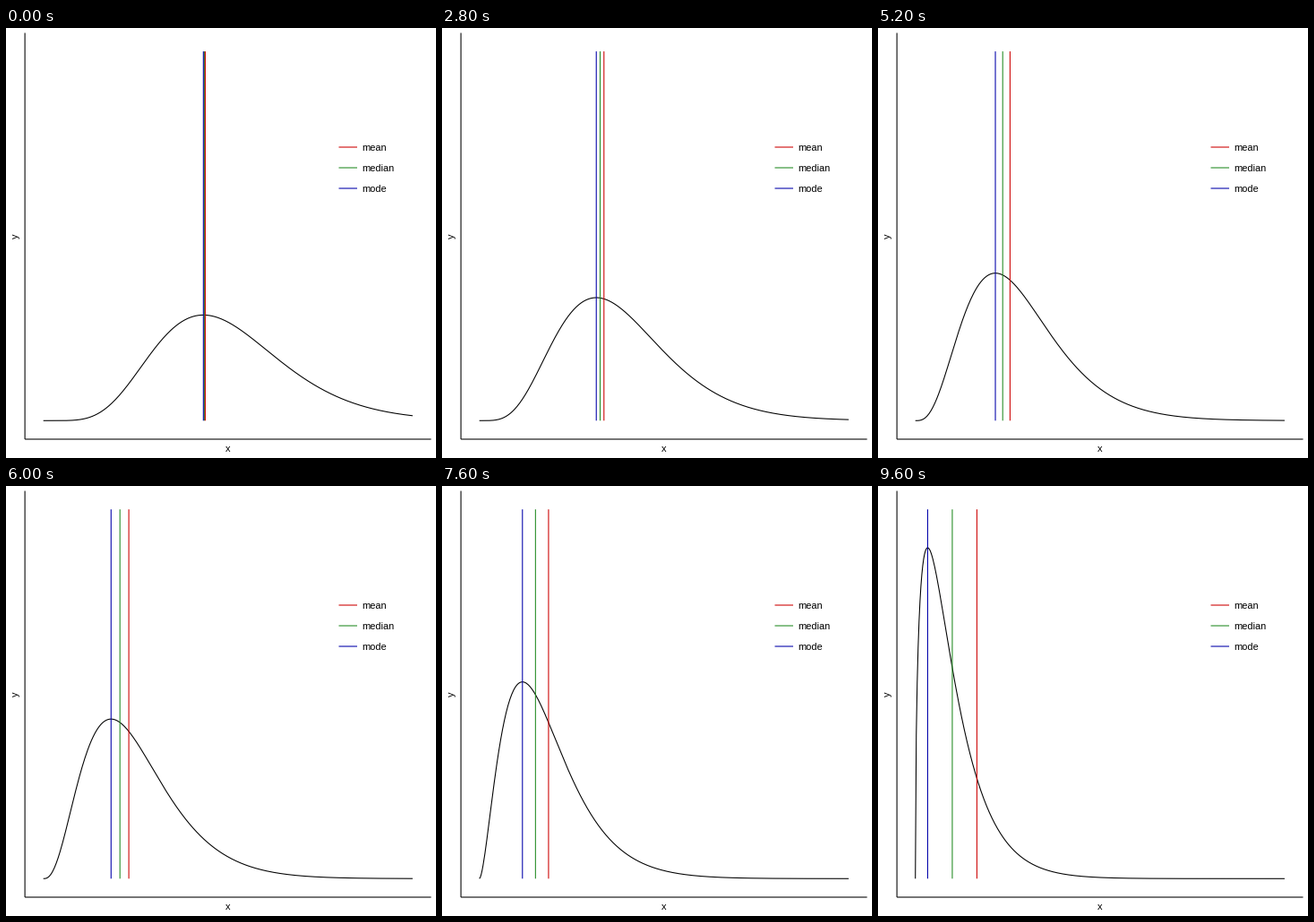
A matplotlib script that plays this animation: 480x480 px, repeating every 10 s.

```python
import math

import matplotlib.pyplot as plt
import numpy as np
from matplotlib.animation import FuncAnimation

SIZE, DPI = 480, 100
PX = 72 / DPI                     # one pixel in points
FRAMES, INTERVAL = 25, 400

LEFT, RIGHT = 41.7, 453.9         # data area in pixels
TOP, BOTTOM = 26.1, 438.3
X_MAX, Y_MAX = 30, 0.27
LINE = 1.07 * PX
RED, GREEN, BLUE = "#cd0000", "#228b22", "#0000aa"

plt.rcParams["font.family"] = "Liberation Sans"
plt.rcParams["font.size"] = 11 * PX


def to_x(v):
    return LEFT + (RIGHT - LEFT) * v / X_MAX


def to_y(v):
    return BOTTOM - (BOTTOM - TOP) * v / Y_MAX


def chi2_pdf(x, df):
    h = df / 2
    return x ** (h - 1) * np.exp(-x / 2) / (2 ** h * math.gamma(h))


fig = plt.figure(figsize=(SIZE / DPI, SIZE / DPI), dpi=DPI, facecolor="white")
ax = fig.add_axes([0, 0, 1, 1])
ax.set_xlim(0, SIZE)
ax.set_ylim(SIZE, 0)
ax.axis("off")


def stroke(xs, ys, color="black", **kw):
    # unsnapped, so lines keep their place between pixels
    return ax.plot(xs, ys, color=color, lw=LINE, snap=False,
                   solid_capstyle="butt", **kw)[0]


# axes and their titles
stroke([21.1, 21.1], [5.5, 459])
stroke([21.1, 474.5], [459, 459])
ax.text(247.8, 473, "x", ha="center", va="baseline")
ax.text(16, 232.2, "y", ha="right", va="center", rotation=90)

# legend
for i, (name, color) in enumerate([("mean", RED), ("median", GREEN), ("mode", BLUE)]):
    y = 133 + 23 * i
    stroke([371.5, 392], [y, y], color)
    ax.text(397.3, y + 4, name, va="baseline")

grid = np.linspace(0, X_MAX, 401)
curve = stroke(to_x(grid), to_y(0 * grid))
median, mean, mode = (stroke([0, 0], [TOP, BOTTOM], c, zorder=3)
                      for c in (GREEN, RED, BLUE))


def update(i):
    peak = 13 - i / 2
    curve.set_ydata(to_y(chi2_pdf(grid, peak + 2)))
    gap = 4 - 1.5 * math.log(peak)
    for line, x in ((mode, peak), (median, peak + gap / 2), (mean, peak + gap)):
        line.set_xdata([to_x(x)] * 2)
    return curve, median, mean, mode


anim = FuncAnimation(fig, update, frames=FRAMES, interval=INTERVAL,
                     init_func=lambda: update(0), repeat=True, repeat_delay=0)
plt.show()
```
